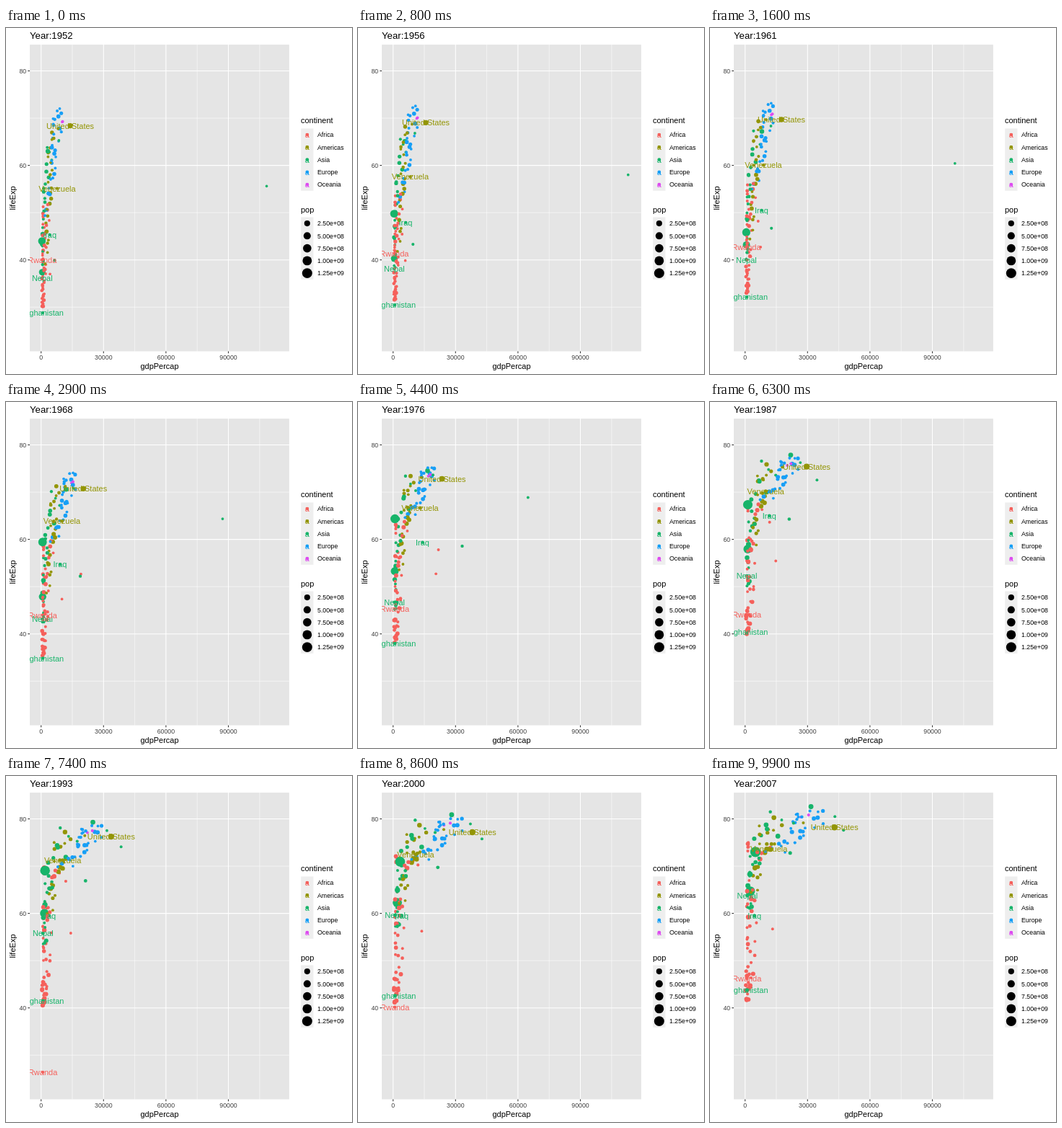
An HTML page that plays this animation: 480 by 480 pixels, repeating every 10 s.

```html
<!DOCTYPE html>
<html lang="en">
<head>
<meta charset="utf-8">
<title>Life expectancy and income by year</title>
<style>
html, body { margin: 0; height: 100%; overflow: hidden; background: #fff; }
svg { display: block; width: 100vw; height: 100vh; font-family: "Liberation Sans", Arial, sans-serif; }
</style>
</head>
<body>
<svg id="stage" viewBox="0 0 480 480"></svg>
<script>
const FRAMES = 100, STEP = 100, FIRST = 1952, LAST = 2007;
const AFRICA = 0, AMERICAS = 1, ASIA = 2, EUROPE = 3, OCEANIA = 4;
const NAMES = ["Africa", "Americas", "Asia", "Europe", "Oceania"];
const COLORS = ["#f5605b", "#939505", "#17b46a", "#179ff6", "#dd4cf0"];
const PANEL = { x: 33, y: 23.1, w: 359.9, h: 425.4 };
const stage = document.getElementById("stage");

const px = gdp => 48.7 + gdp * 0.0028867;
const py = life => 59.5 + (80 - life) * 6.555;
const radius = size => 0.7 + 1.067 * size;
const popRadius = millions => radius(1 + 5 * Math.sqrt(millions / 1319));
const mix = (a, b, k) => a + (b - a) * k;

// Function of the year that joins { year: value } points by straight lines.
function track(points) {
  const keys = Object.entries(points).map(([year, value]) => [+year, value]);
  return year => {
    const i = Math.max(1, keys.findIndex(k => k[0] >= year));
    const [y0, v0] = keys[i - 1], [y1, v1] = keys[i];
    return mix(v0, v1, (year - y0) / (y1 - y0));
  };
}
const span = (first, middle, last) => track({ [FIRST]: first, 1980: middle, [LAST]: last });

let seed = 1952;
function rand() {
  seed = (seed * 1664525 + 1013904223) % 4294967296;
  return seed / 4294967296;
}

function add(tag, attrs, parent = stage) {
  const el = document.createElementNS("http://www.w3.org/2000/svg", tag);
  for (const key in attrs) el.setAttribute(key, attrs[key]);
  return parent.appendChild(el);
}
function text(x, y, str, size, fill = "#000", anchor = "start", parent = stage) {
  const el = add("text", { x, y, fill, "font-size": size, "text-anchor": anchor }, parent);
  el.textContent = str;
  return el;
}
const line = (x1, y1, x2, y2, stroke, width) =>
  add("line", { x1, y1, x2, y2, stroke, "stroke-width": width });

// Countries with a path of their own; population in millions.
const country = (cont, pop, gdp, life, name) => ({ cont, pop, gdp, life, name });
const singled = [
  country(ASIA, span(8, 15, 32), span(779, 900, 975), span(28.8, 39.3, 43.8), "Afghanistan"),
  country(ASIA, span(5, 13, 27),
    track({ 1952: 4130, 1962: 8342, 1972: 9577, 1977: 14688, 1987: 11644, 1992: 3746, 2007: 4471 }),
    track({ 1952: 45.3, 1972: 57, 1987: 65, 1992: 59.5, 2007: 59.5 }), "Iraq"),
  country(ASIA, span(9, 15, 29), span(546, 710, 1091), span(36.2, 48.2, 63.8), "Nepal"),
  country(AFRICA, span(2.5, 5, 9), span(493, 800, 863),
    track({ 1952: 40, 1962: 43, 1982: 46.2, 1987: 44, 1992: 23.6, 1997: 36.1, 2002: 43.4, 2007: 46.2 }),
    "Rwanda"),
  country(AMERICAS, span(157, 228, 301), span(13990, 24900, 42952),
    track({ 1952: 68.4, 1972: 71.3, 1982: 74.7, 2007: 78.2 }), "United States"),
  country(AMERICAS, span(5, 15, 26),
    track({ 1952: 7690, 1967: 9541, 1977: 13144, 1987: 9884, 2007: 11416 }),
    track({ 1952: 55.1, 1967: 63.5, 1987: 70.2, 2007: 73.7 }), "Venezuela"),
  // Kuwait, Saudi Arabia, Libya, Gabon: oil booms
  country(ASIA, span(0.2, 1.4, 2.5),
    track({ 1952: 108382, 1957: 113523, 1967: 80895, 1972: 109348, 1977: 59265, 1982: 31354, 2007: 47307 }),
    span(55.6, 70.8, 77.6)),
  country(ASIA, span(4, 10, 28),
    track({ 1952: 6460, 1967: 16903, 1977: 34168, 1987: 21198, 2007: 21655 }), span(39.9, 61.3, 72.8)),
  country(AFRICA, span(1, 3, 6),
    track({ 1952: 2388, 1962: 6757, 1967: 18773, 1977: 21951, 1987: 11771, 2007: 12057 }),
    span(42.7, 60, 74)),
  country(AFRICA, span(0.4, 0.7, 1.5),
    track({ 1952: 4293, 1972: 11401, 1977: 21745, 1982: 15113, 2007: 13206 }), span(37, 55, 56.7)),
  // China, India, Japan
  country(ASIA, span(556, 980, 1319), track({ 1952: 400, 1982: 962, 1992: 1656, 2007: 4959 }),
    track({ 1952: 44, 1957: 50.5, 1962: 44.5, 1967: 58.4, 1972: 63.1, 2007: 73 })),
  country(ASIA, span(372, 680, 1110), span(547, 830, 2452), span(37.4, 55.6, 64.7)),
  country(ASIA, span(86, 117, 127), span(3217, 18500, 31656), span(63, 76.2, 82.6))
];

// All others keep a rank between the low and high curves of their continent.
const clouds = [
  { cont: AFRICA, n: 49, skew: 1.3, bend: 1, spread: 0.6, drift: 0.35, pop: 30, growth: 3.8,
    life: [span(30, 38.5, 40), span(52, 67, 76)],
    gdp: [span(300, 400, 300), span(4700, 9000, 13500)] },
  { cont: AMERICAS, n: 23, skew: 0.8, bend: 1, spread: 0.4, drift: 0.2, pop: 50, growth: 2.8,
    life: [span(38, 55, 64), span(68.8, 75.2, 80.7)],
    gdp: [span(1450, 2200, 1800), span(8500, 15000, 30000)] },
  { cont: ASIA, n: 25, skew: 1, bend: 1.5, spread: 0.3, drift: 0.2, pop: 70, growth: 2.7,
    life: [span(36, 45, 60.5), span(65.4, 76, 82)],
    gdp: [span(350, 600, 950), span(9000, 22000, 46000)] },
  { cont: EUROPE, n: 30, skew: 0.6, bend: 0.6, spread: 0.3, drift: 0.2, pop: 65, growth: 1.25,
    life: [span(46, 65, 71), span(72.5, 75.9, 81.8)],
    gdp: [span(1000, 4000, 5900), span(12500, 25500, 46000)] },
  { cont: OCEANIA, n: 2, skew: 1, bend: 1, spread: 0, drift: 0, pop: 8, growth: 2.2,
    life: [span(69.1, 73.7, 80), span(69.4, 74.8, 81.4)],
    gdp: [span(10000, 17000, 24000), span(10600, 20500, 36000)] }
];

function cloudMember(c, i) {
  const bounce = v => 1 - Math.abs(1 - Math.abs(v));
  const first = ((i + rand()) / c.n) ** c.skew;
  const last = bounce(first + (rand() - 0.5) * c.drift);
  const wealth = mix(first ** c.bend, rand(), c.spread);
  const pop = 0.5 + c.pop * rand() ** 3;
  const rank = track({ [FIRST]: first, [LAST]: last });
  const [lifeLow, lifeHigh] = c.life, [gdpLow, gdpHigh] = c.gdp;
  return country(
    c.cont,
    track({ [FIRST]: pop, [LAST]: pop * c.growth }),
    year => gdpLow(year) * (gdpHigh(year) / gdpLow(year)) ** wealth,
    year => mix(lifeLow(year), lifeHigh(year), rank(year))
  );
}

// Background and axes
add("rect", { width: 480, height: 480, fill: "#fff" });
add("rect", { x: PANEL.x, y: PANEL.y, width: PANEL.w, height: PANEL.h, fill: "#e5e5e5" });
const right = PANEL.x + PANEL.w, bottom = PANEL.y + PANEL.h;
const gridX = (gdp, w) => line(px(gdp), PANEL.y, px(gdp), bottom, "#fff", w);
const gridY = (life, w) => line(PANEL.x, py(life), right, py(life), "#fff", w);
for (let g = 15000; g < 110000; g += 30000) gridX(g, 0.53);
for (let l = 30; l < 80; l += 20) gridY(l, 0.53);
for (let g = 0; g <= 90000; g += 30000) {
  gridX(g, 1.07);
  line(px(g), bottom, px(g), bottom + 2.75, "#333", 1.07);
  text(px(g), 459.8, g, 8.8, "#404040", "middle");
}
for (let l = 40; l <= 80; l += 20) {
  gridY(l, 1.07);
  line(PANEL.x - 2.75, py(l), PANEL.x, py(l), "#333", 1.07);
  text(28.2, py(l) + 3.2, l, 8.8, "#404040", "end");
}
text(213, 472.6, "gdpPercap", 11, "#000", "middle");
text(0, 0, "lifeExp", 11, "#000", "middle").setAttribute("transform", "translate(13 236) rotate(-90)");
const title = text(33, 15.2, "", 13.2);

// Legends
const KEY = 17.28, keyX = 409.2, keyMid = keyX + KEY / 2;
function legend(name, titleY, top, labels, drawKey) {
  text(409, titleY, name, 11);
  add("rect", { x: keyX, y: top, width: KEY, height: KEY * 5, fill: "#eee" });
  labels.forEach((label, i) => {
    const y = top + KEY * (i + 0.5);
    drawKey(y, i);
    text(432, y + 3.2, label, 8.8);
  });
}
legend("continent", 132, 139.4, NAMES, (y, i) => {
  add("circle", { cx: keyMid, cy: y, r: radius(1.5), fill: COLORS[i] });
  text(keyMid, y + 4, "a", 11, COLORS[i], "middle");
});
legend("pop", 256.2, 262.4, ["2.50e+08", "5.00e+08", "7.50e+08", "1.00e+09", "1.25e+09"], (y, i) =>
  add("circle", { cx: keyMid, cy: y, r: popRadius(250 * (i + 1)) }));

// Countries, labels above all dots
const clip = add("clipPath", { id: "panel" });
add("rect", { x: PANEL.x, y: PANEL.y, width: PANEL.w, height: PANEL.h }, clip);
const plot = add("g", { "clip-path": "url(#panel)" });
const members = clouds.flatMap(c => Array.from({ length: c.n }, (_, i) => cloudMember(c, i)));
const countries = [...members, ...singled]
  .map(c => ({ ...c, order: rand() }))
  .sort((a, b) => a.order - b.order);
for (const c of countries) c.dot = add("circle", { fill: COLORS[c.cont] }, plot);
for (const c of countries) {
  if (c.name) c.label = text(0, 0, c.name, 11, COLORS[c.cont], "middle", plot);
}

function place(el, attrs) {
  for (const key in attrs) el.setAttribute(key, attrs[key].toFixed(2));
}

function draw(now) {
  const frame = Math.floor(now / STEP) % FRAMES;
  const year = mix(FIRST, LAST, frame / (FRAMES - 1));
  title.textContent = "Year:" + Math.round(year);
  for (const c of countries) {
    const x = px(c.gdp(year)), y = py(c.life(year));
    place(c.dot, { cx: x, cy: y, r: popRadius(c.pop(year)) });
    if (c.label) place(c.label, { x, y: y + 4 });
  }
}

const start = performance.now();
function tick() {
  draw(performance.now() - start);
  requestAnimationFrame(tick);
}
tick();
</script>
</body>
</html>
```
